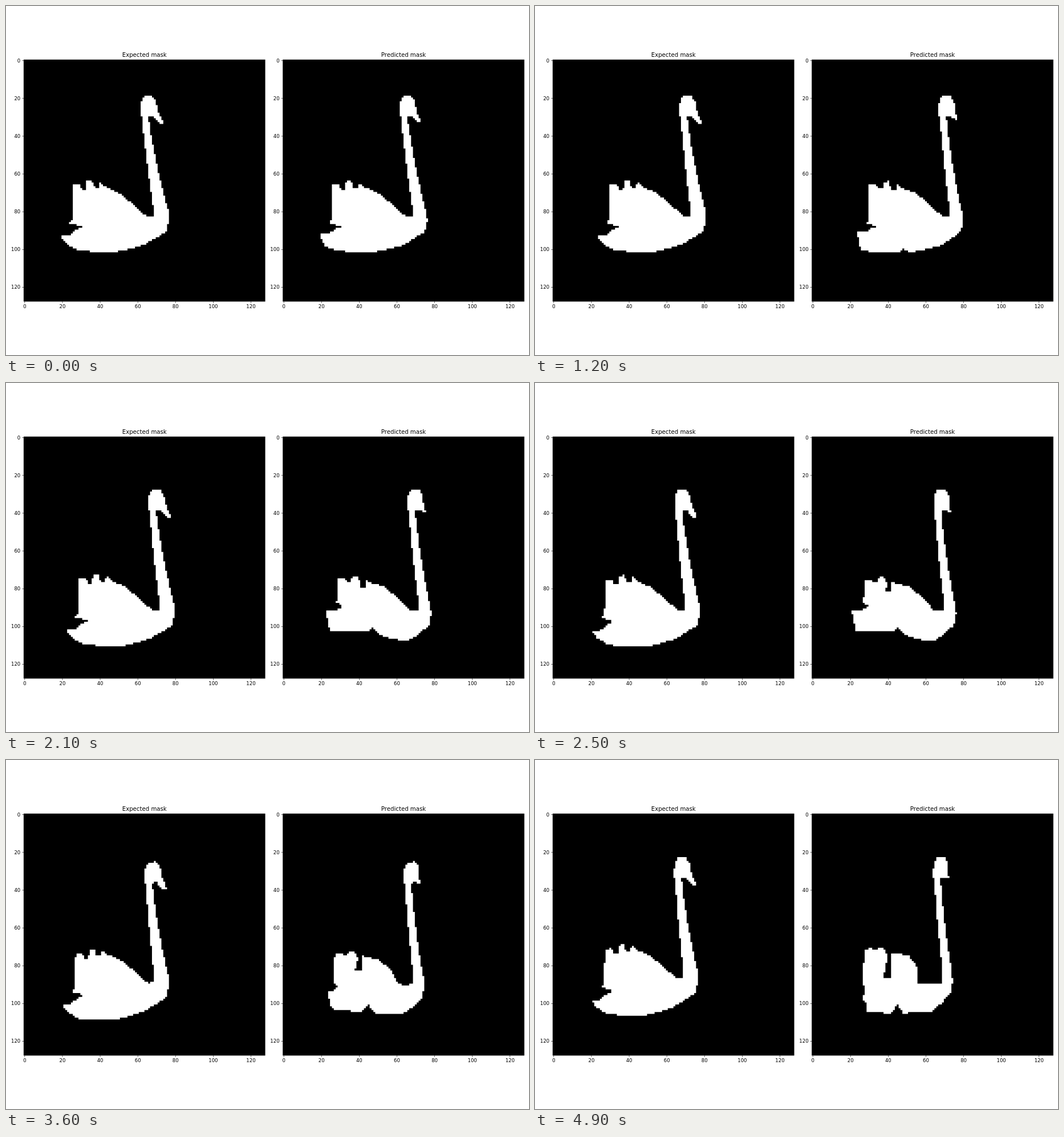
An HTML page with a canvas for the animation above (5000 ms loop, 917 px wide and 611 px high).

```html
<!DOCTYPE html>
<html lang="en">
<head>
<meta charset="utf-8">
<title>Mask comparison</title>
<style>
  html, body { margin: 0; width: 100%; height: 100%; overflow: hidden; background: #fff; }
  canvas { display: block; }
</style>
</head>
<body>
<canvas id="stage" width="917" height="611"></canvas>
<script>
const ctx = document.getElementById('stage').getContext('2d');
const LOOP = 5000, STEP = 100;
const GRID = 128, CELL = 3.305, SIDE = GRID * CELL, TOP = 94.1;
const TITLE = 10.19, LABEL = 8.49, TICK = 2.97;
const FONT = '"DejaVu Sans", Verdana, sans-serif';

const lerp = (a, b, k) => a + (b - a) * k;
const clamp = k => Math.min(1, Math.max(0, k));

// Smooth 0 to 1 between two times
function ramp(t, from, to) {
  const k = clamp((t - from) / (to - from));
  return k * k * (3 - 2 * k);
}

// How the bird moves over the grid
function driftAt(t) {
  const late = ramp(t, 2100, 3000);
  return {
    x: 4.2 * ramp(t, 0, 1300) - 3.6 * ramp(t, 1600, 2900) + 0.5 * ramp(t, 3000, 4000),
    y: 9 * ramp(t, 1300, 2000) - 1.2 * (ramp(t, 0, 500) - ramp(t, 700, 1200))
      - 2.6 * ramp(t, 2400, 3600) - 2.4 * ramp(t, 4200, 5000),
    lean: 1.3 * ramp(t, 0, 400) + late,
    squeeze: late,
    tilt: 1.5 * late
  };
}

// Outline in grid cells. wear: 0 clean to 1 badly predicted;
// lag: share of the vertical drift that the lower left follows;
// stub: 0 full tail to 1 none.
function swan(t, wear, lag, stub) {
  const d = driftAt(t), pts = [];
  const blunt = Math.sqrt(wear), step = wear ** 4, square = Math.sin(Math.PI * wear);

  function add(u, v) {
    const share = v > 84 ? lerp(lag, 1, clamp((u - 45) / 15)) : 1;
    pts.push([
      u + d.x + d.lean * clamp((85 - v) / 65) - d.squeeze * (u - 26) / 50,
      v + share * (d.y + d.tilt * (70 - u) / 50)
    ]);
  }
  const line = (...points) => points.forEach(([u, v]) => add(u, v));

  // crest feathers, the gap behind them, back and saddle
  const gap = 68 + 14 * wear ** 2;
  line([26, 66.5], [29.5, 66], [31, 69 - 2.5 * wear], [33, 69 - 2.5 * wear],
    [33.2, 64.5 + 1.5 * wear], [36, 64 + 1.5 * wear], [37 + 2 * wear, 67 + 3 * wear],
    [38 - wear, gap], [39.4 + 1.6 * wear, gap], [40.6 + 0.4 * wear, 65 + 4 * wear],
    [43, 67.2 + 2 * wear], [50, 70.2], [58 - 3 * step, 76.5],
    [64 - 9 * step, 82 + 4 * step], [66 - 9 * step, 83 + 3 * step], [69, 83 + 3 * step]);

  // neck, left edge upwards
  for (let s = 1; s > -0.01; s -= 0.1) add(62.6 + 5 * s + 1.4 * s * s, 30 + 50 * s);

  // head and beak
  line([62, 29.9], [62, 23], [63, 20], [64, 19], [68, 19], [70, 22],
    [71.5 - 1.5 * blunt, 28], [74 - 3.5 * blunt, 33 - 3 * blunt],
    [73.5 - 3.5 * blunt, 34 - 4 * blunt], [72 - 2 * blunt, 34 - 4 * blunt], [68.6, 30]);

  // neck, right edge downwards
  for (let s = 0; s < 1.01; s += 0.1) {
    add(66 + (1 - 0.25 * blunt) * (7.2 * s + 3.5 * s * s), 30 + 50 * s);
  }

  // hull, with a bite in the bottom
  line([77 - 2.5 * wear, 85], [75.5 - 2 * wear, 91], [68, 95.7 + wear], [63, 98.3 + 2 * wear],
    [55, 100.6], [48, 102], [44.5, 102 - 5 * wear], [41.5, 102.1], [28, 100.8 + square]);

  // tail
  line([22 + 6 * stub, 97 + 5 * square], [20 + 6 * stub, 94.5 - 2 * square],
    [20 + 6 * stub, 93 - 2 * square], [24 + 2 * stub, 93 - 2 * square],
    [27, 90.5 - square], [31 - 4 * wear, 88.5], [26.5, 87], [24 + 2.3 * wear, 86.4], [26, 85]);
  return pts;
}

function expected(t) {
  return swan(t, 0, 1, 0);
}

function predicted(t) {
  const wear = lerp(0.1, 1, t / (LOOP - STEP));
  return swan(t, wear, 0.15 + 0.6 * ramp(t, 3000, 4500), ramp(t, 3000, 4200));
}

// Fills an outline in whole grid cells
function fillCells(pts, left) {
  ctx.beginPath();
  for (let row = 0; row < GRID; row++) {
    const y = row + 0.5, cuts = [];
    pts.forEach(([x0, y0], i) => {
      const [x1, y1] = pts[(i + 1) % pts.length];
      if ((y0 <= y) !== (y1 <= y)) cuts.push(Math.round(lerp(x0, x1, (y - y0) / (y1 - y0))));
    });
    cuts.sort((a, b) => a - b);
    for (let i = 0; i + 1 < cuts.length; i += 2) {
      ctx.rect(left + cuts[i] * CELL, TOP + row * CELL, (cuts[i + 1] - cuts[i]) * CELL, CELL);
    }
  }
  ctx.fillStyle = '#fff';
  ctx.fill();
}

function label(text, x, y, size, align) {
  ctx.font = size + 'px ' + FONT;
  ctx.textAlign = align;
  ctx.fillText(text, x, y);
}

function panel(title, left, outline) {
  const bottom = TOP + SIDE;
  ctx.fillStyle = '#000';
  ctx.fillRect(left - 0.3, TOP - 0.3, SIDE + 0.6, SIDE + 0.6);
  label(title, left + SIDE / 2, TOP - 5.1, TITLE, 'center');
  for (let n = 0; n <= 120; n += 20) {
    const off = (n + 0.5) * CELL, x = left + off, y = TOP + off;
    label(n, x, bottom + 2 * TICK + 6.2, LABEL, 'center');
    label(n, left - 2 * TICK, y + 3.1, LABEL, 'right');
    ctx.fillRect(x - 0.3, bottom, 0.6, TICK);
    ctx.fillRect(left - TICK, y - 0.3, TICK, 0.6);
  }
  fillCells(outline, left);
}

function draw(t) {
  ctx.fillStyle = '#fff';
  ctx.fillRect(0, 0, 917, 611);
  panel('Expected mask', 31.2, expected(t));
  panel('Predicted mask', 485.5, predicted(t));
}

const start = performance.now();
function tick() {
  const ms = Math.max(0, performance.now() - start) % LOOP;
  draw(Math.floor(ms / STEP) * STEP);
  requestAnimationFrame(tick);
}
tick();
</script>
</body>
</html>
```
